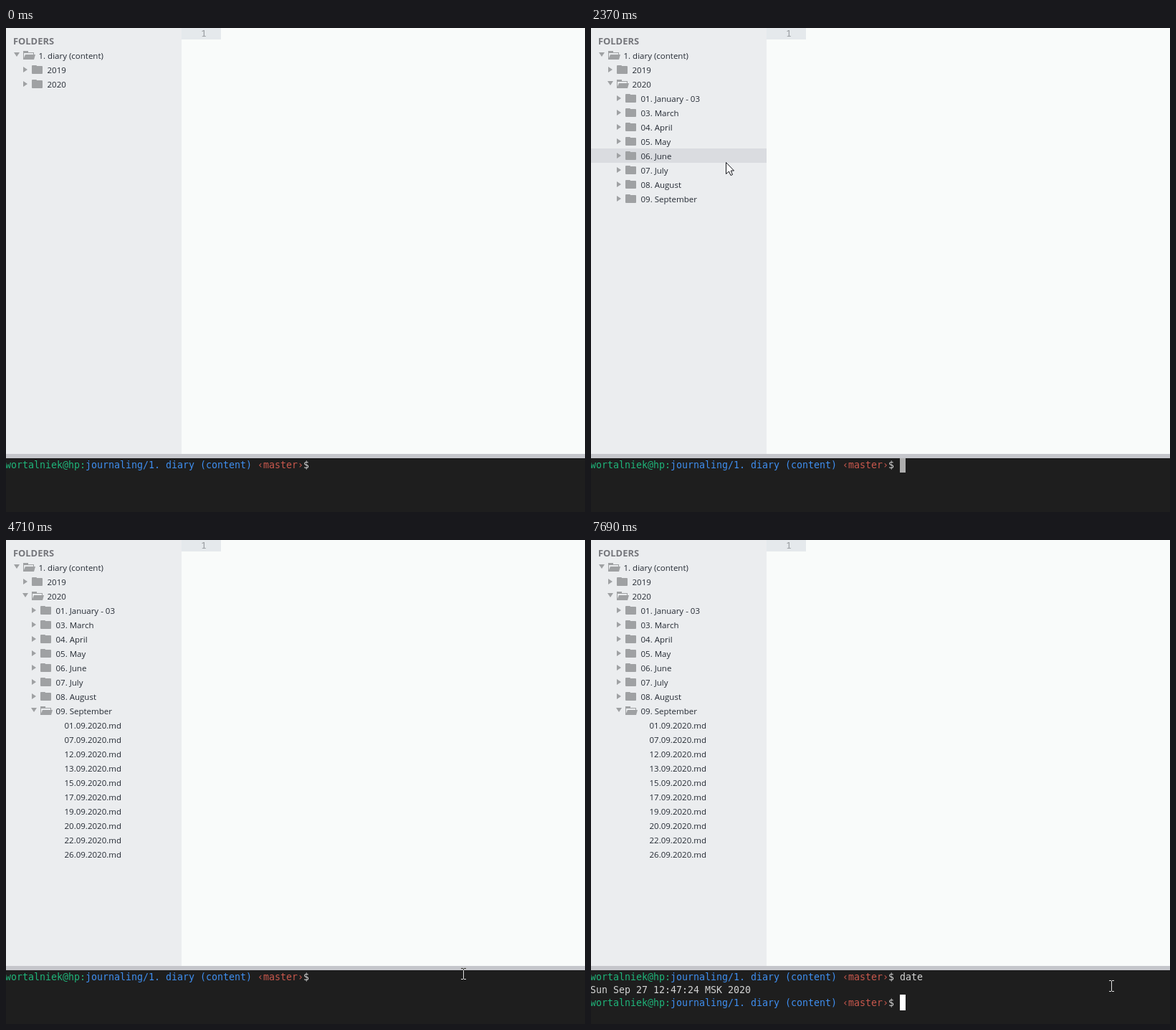
Recreate the animation shown at these times as an HTML page with a canvas. Size 808 px wide and 675 px high, loop 8000 ms.

```html
<!DOCTYPE html>
<html lang="en">
<head>
<meta charset="utf-8">
<title>Diary workspace</title>
<style>
  html, body { margin: 0; width: 100%; height: 100%; overflow: hidden; background: #1e1e1e; }
  canvas { display: block; }
</style>
</head>
<body>
<canvas id="stage" width="808" height="675"></canvas>
<script>
const ctx = document.getElementById('stage').getContext('2d');
const LOOP = 8000, W = 808, H = 675;
const SIDE = 245, EDIT_H = 594, ROW = 20, CELL = 8, LINE = 18;
const UI = '"Open Sans", "Noto Sans", sans-serif';
const MONO = '"DejaVu Sans Mono", monospace';
const ICON = '#9fa1a3', PLAIN = '#d4d4d4';

// moments of the story, in ms
const SHOW = 130, YEAR = 1828, MONTH = 2680, OPEN_MS = 390;
const ENTER = 7540, REPLY = 7620, READY = 7690;
const TYPED_AT = [5960, 6040, 6360, 6510];

const MONTHS = ['01. January - 03', '03. March', '04. April', '05. May', '06. June',
  '07. July', '08. August', '09. September'];
const DAYS = '01 07 12 13 15 17 19 20 22 26'.split(' ');
const PROMPT = [
  ['wortalniek@hp:', '#1fb57a'],
  ['journaling/1. diary (content)', '#3f8ff0'],
  [' ‹master›', '#c9584d'],
  ['$ ', PLAIN]
];
const PROMPT_LEN = PROMPT.map(p => p[0]).join('').length;

// each leg of the pointer: start, end, and where it comes to rest
const LEGS = [
  { from: 130, to: 350, x: 716, y: 623 },
  { from: 930, to: 1740, x: 165, y: 78 },
  { from: 2200, to: 2600, x: 199, y: 240 },
  { from: 3640, to: 3840, x: 204, y: 384 },
  { from: 3840, to: 4480, x: 236, y: 454 },
  { from: 4480, to: 4710, x: 638, y: 605 },
  { from: 4710, to: 5110, x: 726, y: 622 }
];

const clamp = v => Math.max(0, Math.min(1, v));
const smooth = v => { v = clamp(v); return v * v * (3 - 2 * v); };
const easeOut = v => 1 - (1 - clamp(v)) ** 2;

function pointerAt(t) {
  let x = 741, y = 654;
  for (const leg of LEGS) {
    const u = easeOut((t - leg.from) / (leg.to - leg.from));
    x += (leg.x - x) * u;
    y += (leg.y - y) * u;
  }
  return [Math.round(x), Math.round(y)];
}

// the caret fades in quickly and out more slowly
const pulse = (t, on, off) => smooth((t - on) / 110) * (1 - smooth((t - off) / 200));

function caretAlpha(t) {
  if (t >= ENTER) return 1;
  let a = pulse(t, 1200, 2290) + pulse(t, 5695, 6880);
  for (let on = 2690; on < 4400; on += 700) a += pulse(t, on, on + 290);
  return a;
}

function rect(x, y, w, h, color) {
  ctx.fillStyle = color;
  ctx.fillRect(x, y, w, h);
}

function text(str, x, y, font, color) {
  ctx.font = font;
  ctx.fillStyle = color;
  ctx.fillText(str, x, y);
}

function polygon(points, color) {
  ctx.beginPath();
  for (const [x, y] of points) ctx.lineTo(x, y);
  ctx.closePath();
  ctx.fillStyle = color;
  ctx.fill();
}

function folder(x, y, open) {
  if (open) {
    polygon([[x - 13, y - 4], [x - 5, y - 4], [x - 9, y + 2]], ICON);
    rect(x, y - 6, 7, 2, ICON);
    ctx.strokeStyle = ICON;
    ctx.lineWidth = 1;
    ctx.strokeRect(x + .5, y - 3.5, 14, 9);
    polygon([[x + 3, y - 1], [x + 17, y - 1], [x + 15, y + 6], [x, y + 6]], ICON);
  } else {
    polygon([[x - 12, y - 4], [x - 6, y], [x - 12, y + 4]], ICON);
    ctx.beginPath();
    ctx.roundRect(x, y - 6, 7, 4, 1);
    ctx.roundRect(x, y - 5, 15, 11, 1);
    ctx.fillStyle = ICON;
    ctx.fill();
  }
}

function entry(label, depth, y, open) {
  const x = 24 + depth * 12;
  if (open !== undefined) folder(x, y, open);
  text(label, x + 21.5, y + 4.5, '11.5px ' + UI, '#242a33');
}

// children slide out from beneath their parent
function reveal(top, count, shown, drawItem) {
  const h = Math.round(count * ROW * shown);
  if (!h) return;
  ctx.save();
  ctx.beginPath();
  ctx.rect(0, top, SIDE, h);
  ctx.clip();
  for (let i = 0; i < count; i++) drawItem(i, top + h - (count - i) * ROW + ROW / 2);
  ctx.restore();
}

function sidebar(t, mx, my) {
  rect(0, 0, SIDE, EDIT_H, '#ebedef');
  const year = smooth((t - YEAR) / OPEN_MS);
  const month = smooth((t - MONTH) / OPEN_MS);
  const rows = 3 + Math.round(year * MONTHS.length) + Math.round(month * DAYS.length);
  const row = Math.floor((my - 28) / ROW);
  if (t >= YEAR && mx < SIDE && row >= 0 && row < rows) {
    rect(0, 28 + row * ROW, SIDE, ROW, '#dadce0');
  }
  text('FOLDERS', 10, 22.5, 'bold 12.9px ' + UI, '#75767b');
  entry('1. diary (content)', 0, 38, true);
  entry('2019', 1, 58, false);
  entry('2020', 1, 78, t >= YEAR - 80);
  reveal(88, MONTHS.length, year, (i, y) =>
    entry(MONTHS[i], 2, y, i === MONTHS.length - 1 && t >= MONTH));
  reveal(248, DAYS.length, month, (i, y) => entry(DAYS[i] + '.09.2020.md', 3, y));
}

function editor() {
  rect(SIDE, 0, W - SIDE, EDIT_H, '#f9fbfa');
  rect(SIDE, 0, 55, 16, '#e5e9ec');
  text('1', 272, 12, '13.3px "Noto Sans Mono", monospace', '#95999d');
}

function print(str, col, line, color) {
  text(str, col * CELL - 1, 614 + line * LINE, '13.29px ' + MONO, color);
}

function prompt(line) {
  let col = 0;
  for (const [str, color] of PROMPT) {
    print(str, col, line, color);
    col += str.length;
  }
}

function terminal(t) {
  rect(0, EDIT_H, W, 6, '#c5c6cb');
  rect(0, 600, W, 75, '#1e1e1e');
  const typed = TYPED_AT.filter(k => t >= k).length;
  let col = PROMPT_LEN + typed, line = 0;
  prompt(0);
  print('date'.slice(0, typed), PROMPT_LEN, 0, PLAIN);
  if (t >= ENTER) {
    col = 0;
    line = 1;
  }
  if (t >= REPLY) {
    print('Sun Sep 27 12:47:24 MSK 2020', 0, 1, PLAIN);
    line = 2;
  }
  if (t >= READY) {
    prompt(2);
    col = PROMPT_LEN;
  }
  const top = Math.max(600, 598 + line * LINE);
  ctx.globalAlpha = clamp(caretAlpha(t));
  rect(Math.max(0, col * CELL - 1), top, CELL, 620 + line * LINE - top, '#ffffff');
  ctx.globalAlpha = 1;
}

function arrow(x, y) {
  ctx.save();
  ctx.translate(x + .5, y + .5);
  polygon([[0, 0], [0, 16], [4, 12.5], [6.5, 18], [9, 17], [6.7, 11.5], [11, 11.5]], '#ffffff');
  ctx.strokeStyle = '#15171c';
  ctx.lineWidth = 1;
  ctx.stroke();
  ctx.restore();
}

// the text pointer inverts whatever lies below it
function beam(x, y) {
  ctx.globalCompositeOperation = 'difference';
  rect(x, y - 7, 1, 14, '#ffffff');
  for (const dy of [-8, 7]) {
    rect(x - 3, y + dy, 3, 1, '#ffffff');
    rect(x + 1, y + dy, 3, 1, '#ffffff');
  }
  ctx.globalCompositeOperation = 'source-over';
}

function draw(t) {
  const [mx, my] = pointerAt(t);
  ctx.clearRect(0, 0, W, H);
  sidebar(t, mx, my);
  editor();
  terminal(t);
  if (t >= SHOW) (mx < SIDE ? arrow : beam)(mx, my);
}

const start = performance.now();
function tick() {
  draw((performance.now() - start) % LOOP);
  requestAnimationFrame(tick);
}
tick();
</script>
</body>
</html>
```
